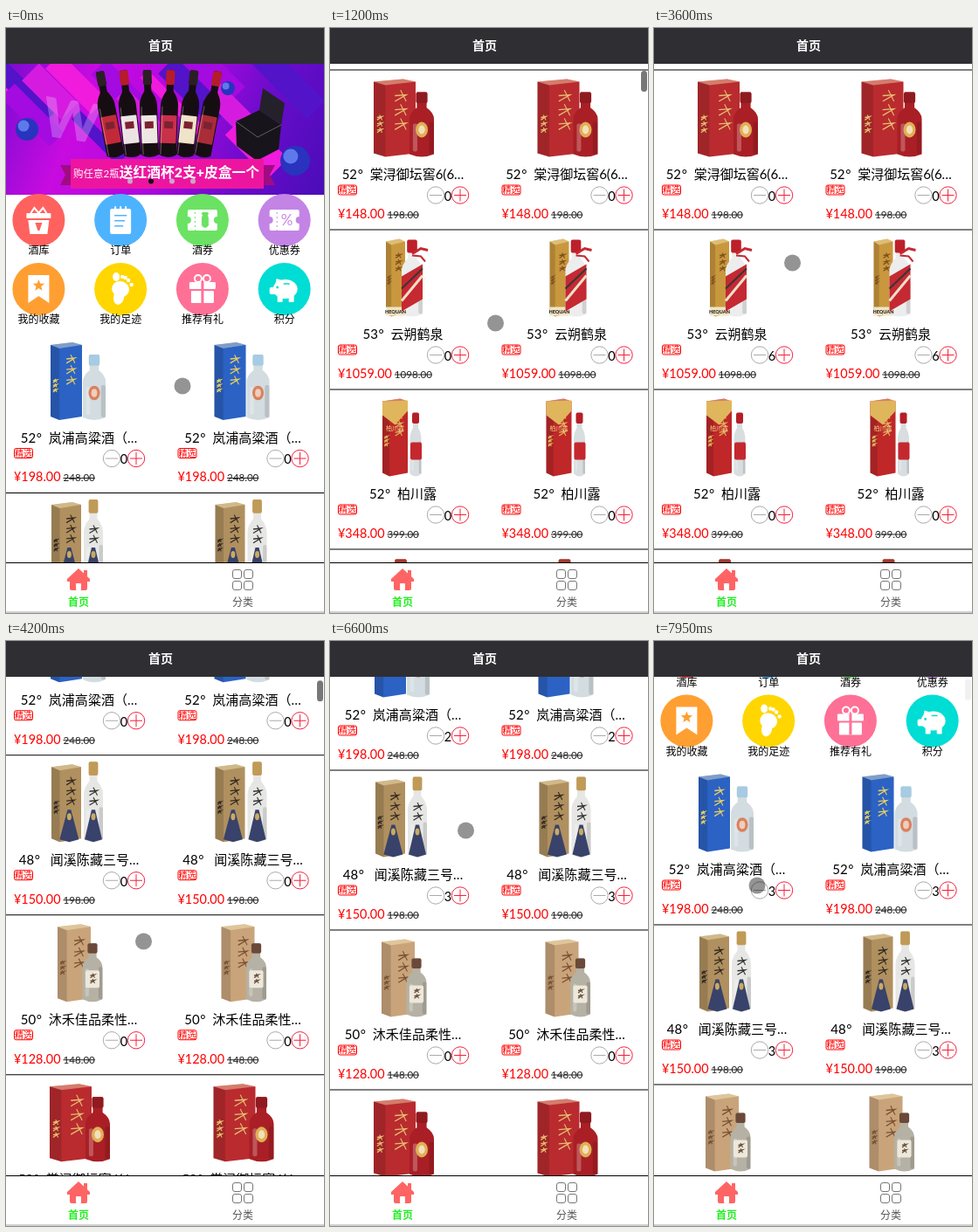
An HTML page with a canvas for the animation above (8000 ms loop, 364 px wide and 670 px high).

```html
<!DOCTYPE html>
<html lang="zh">
<head>
<meta charset="utf-8">
<title>首页</title>
<style>
html, body { margin: 0; width: 100%; height: 100%; overflow: hidden; background: #fff; }
canvas { display: block; width: 364px; height: 670px; }
</style>
</head>
<body>
<canvas id="stage"></canvas>
<script>
const W = 364, H = 670, LOOP = 8000, STEP = 150;
const TOP = 41, BAR = 612, FIRST = 349, ROW = 183, COL = 187.5;
const FONT = 'Lato, "Noto Sans CJK SC", "Noto Sans CJK", sans-serif';
const RED = '#f5203c';
const canvas = document.getElementById('stage');
const ctx = canvas.getContext('2d');
const ratio = window.devicePixelRatio || 1;
canvas.width = W * ratio;
canvas.height = H * ratio;

// Motion
const flicks = [
  { start: 0, time: 600, by: 236 },
  { start: 600, time: 600, by: 614.5 },
  { start: 3600, time: 900, by: -466 },
  { start: 6600, time: 750, by: -177 }
];
const tapRuns = [
  { row: 4, start: 1650, times: 6 },
  { row: 1, start: 4800, times: 3 },
  { row: 0, start: 5850, times: 2 },
  { row: 0, start: 7500, times: 1 }
];
const TAP_GAP = 300;
// Finger rests: time, x, y
const touches = [[0, 202, 410], [600, 186, 419.5], [1200, 189.5, 338], [1500, 151, 373],
  [3150, 151, 373], [3600, 158.5, 269], [4200, 157.5, 344], [4650, 151, 291], [5400, 151, 291],
  [5700, 151, 108], [6150, 151, 108], [6600, 155.5, 217], [7350, 150, 287], [7600, 150, 287],
  [7950, 118, 280]];

const clamp = v => Math.min(1, Math.max(0, v));
const easeOut = p => 1 - (1 - p) ** 3;
const easeBoth = p => p * p * (3 - 2 * p);

const scrollAt = t => flicks.reduce((sum, f) => sum + f.by * easeOut(clamp((t - f.start) / f.time)), 0);
const barAlpha = t => Math.max(...flicks.map(f =>
  t > f.start ? clamp((f.start + f.time + 630 - t) / 300) : 0));
const countAt = (row, t) => tapRuns.filter(r => r.row === row && t >= r.start)
  .reduce((sum, r) => sum + Math.min(r.times, Math.floor((t - r.start) / TAP_GAP) + 1), 0);

function touchAt(t) {
  const i = touches.findIndex(k => k[0] > t);
  if (i < 0) return touches[touches.length - 1].slice(1);
  const [t0, x0, y0] = touches[i - 1], [t1, x1, y1] = touches[i];
  const p = easeBoth((t - t0) / (t1 - t0));
  return [x0 + (x1 - x0) * p, y0 + (y1 - y0) * p];
}

// Drawing helpers
function rect(c, x, y, w, h, r = 0) {
  ctx.fillStyle = c;
  ctx.beginPath();
  ctx.roundRect(x, y, w, h, r);
  ctx.fill();
}
function frame(c, x, y, w, h, r) {
  ctx.strokeStyle = c;
  ctx.lineWidth = 1;
  ctx.beginPath();
  ctx.roundRect(x, y, w, h, r);
  ctx.stroke();
}
function trace(p) {
  ctx.beginPath();
  for (let i = 0; i < p.length; i += 2) ctx.lineTo(p[i], p[i + 1]);
}
function poly(c, ...p) {
  trace(p);
  ctx.fillStyle = c;
  ctx.fill();
}
function line(c, lw, ...p) {
  trace(p);
  ctx.strokeStyle = c;
  ctx.lineWidth = lw;
  ctx.stroke();
}
function oval(c, x, y, rx, ry = rx, turn = 0) {
  ctx.fillStyle = c;
  ctx.beginPath();
  ctx.ellipse(x, y, rx, ry, turn, 0, 7);
  ctx.fill();
}
function ring(c, x, y, r, lw = 1) {
  ctx.strokeStyle = c;
  ctx.lineWidth = lw;
  ctx.beginPath();
  ctx.arc(x, y, r, 0, 7);
  ctx.stroke();
}
function shift(x, y, draw, turn = 0) {
  ctx.save();
  ctx.translate(x, y);
  ctx.rotate(turn);
  draw();
  ctx.restore();
}
// Vertically centred text; returns its width
function label(s, x, y, size, c = '#000', align = 'center', weight = 400) {
  ctx.font = `${weight} ${size}px ${FONT}`;
  ctx.textAlign = align;
  ctx.fillStyle = c;
  ctx.fillText(s, x, y + size * 0.37);
  return ctx.measureText(s).width;
}
// Bottle standing on y
function bottle(c, cap, x, y, w, h) {
  const b = w / 2, n = Math.max(3, w * 0.2), top = y - h, s = top + h * 0.36;
  ctx.fillStyle = c;
  ctx.beginPath();
  ctx.moveTo(x - n, top);
  ctx.lineTo(x - n, s - h * 0.12);
  ctx.quadraticCurveTo(x - b, s - 3, x - b, s + 4);
  ctx.lineTo(x - b, y - 3);
  ctx.quadraticCurveTo(x, y + 3, x + b, y - 3);
  ctx.lineTo(x + b, s + 4);
  ctx.quadraticCurveTo(x + b, s - 3, x + n, s - h * 0.12);
  ctx.lineTo(x + n, top);
  ctx.fill();
  rect(cap, x - n - 1, top, n * 2 + 2, h * 0.17, 2);
}
// Brush marks standing in for vertical lettering
function brush(c, x, y, size, n) {
  const s = size / 2;
  for (let i = 0; i < n; i++) {
    const v = y + i * size * 1.25;
    line(c, 1.3, x - s, v, x + s, v - 1, x - s, v + s);
    line(c, 1.1, x, v - s, x + s, v + s);
  }
}

// Marks on the packs; each gets the product
function seal({ cx, ink, bw }) {
  oval(ink, cx, 69, bw * 0.25, bw * 0.32);
  oval('rgba(255,255,255,.6)', cx, 69, bw * 0.13, bw * 0.18);
}
function skirt({ x, w, cx, ink }) {
  brush(ink, cx, 42, 9, 2);
  for (const [mid, half] of [[x + w * 0.6, 11], [cx, 10]]) {
    poly('#38426a', mid - 2, 63, mid + 2, 63, mid + half, 97, mid, 100, mid - half, 97);
    oval('#c9aa60', mid, 71, 2.5, 4);
  }
}
function paper({ cx, bw, ink }) {
  rect('#eee8da', cx - bw * 0.35, 64, bw * 0.7, 20, 2);
  brush(ink, cx, 70, 5, 2);
}
function sash({ x, w, cx }) {
  rect('#f1e4c2', x, 89, w, 10);
  label('HEQUAN', x + w / 2, 94.5, 5.5, '#333', 'center', 900);
  line('#c52932', 3, cx, 28, cx + 10, 22, cx + 18, 24);
  line('#c52932', 2, cx, 30, cx + 10, 31, cx + 15, 37);
  poly('#c52932', cx - 12, 54, cx + 12, 40, cx + 12, 80, cx - 12, 94);
  line('#f0dfc9', 3, cx - 12, 82, cx + 12, 53);
  line('#383636', 2, cx - 12, 68, cx + 12, 45);
}
function goldTop(item) {
  const { x, w } = item;
  poly('#dfb65b', x, 14, x + w, 13, x + w, 25, x + w / 2, 41, x, 30);
  label('柏川露', x + w / 2, 45, 7, '#f4dc8c');
  rect('#c4282e', item.cx - 6, 61, 13, 20, 2);
}

// x, w: box; cx, bw, bh: bottle
const goods = [
  { deg: 52, name: '岚浦高粱酒（…', price: 198, was: 248, x: 51, w: 36, cx: 101, bw: 26, bh: 75,
    card: '#2b62c4', glass: '#d3dce0', cap: '#a7cbe2', ink: '#d9825c', text: '#e9cf62', mark: seal },
  { deg: 48, name: '闻溪陈藏三号…', price: 150, was: 198, x: 52, w: 34, cx: 100, bw: 22, bh: 92, gap: 4,
    card: '#b0905f', glass: '#e6e6e4', cap: '#c09a57', ink: '#333', text: '#352a22', mark: skirt },
  { deg: 50, name: '沐禾佳品柔性…', price: 128, was: 148, x: 59, w: 38, cx: 99, bw: 23, bh: 67,
    card: '#c9a47b', glass: '#b5b1a4', cap: '#6b4939', ink: '#68503e', text: '#7a5130', mark: paper },
  { deg: 52, name: '棠浔御坛窖6(6…', price: 148, was: 198, x: 50, w: 48, cx: 105, bw: 28, bh: 74,
    card: '#b92b2f', glass: '#a91f25', cap: '#8f1a20', ink: '#e0b055', text: '#e6c070', mark: seal },
  { deg: 53, name: '云朔鹤泉', price: 1059, was: 1098, x: 64, w: 22, cx: 94, bw: 24, bh: 88,
    card: '#c9983e', glass: '#ededed', cap: '#bd2029', text: '#7e501e', mark: sash },
  { deg: 52, name: '柏川露', price: 348, was: 399, x: 60, w: 29, cx: 98, bw: 13, bh: 73,
    card: '#bf2729', glass: '#d8dde0', cap: '#b51e27', text: '#dfb65b', mark: goldTop },
  { deg: 52, name: '禾汀酿', price: 168, was: 188, x: 68, w: 12, cx: 81, bw: 30, bh: 88,
    card: '#fff', glass: '#8e2f27', cap: '#a3392c', ink: '#d8b060', text: '#fff', mark: seal }
];

function pack(item) {
  const { x, w, cx, bw, bh } = item, edge = x + w * 0.28, end = x + w;
  poly(item.card, x, 14, x + w * 0.7, 11, end, 14, end, 96, edge, 100, x, 96);
  poly('rgba(0,0,0,.14)', x, 14, edge, 18, edge, 100, x, 96);
  poly('rgba(255,245,200,.4)', x, 14, x + w * 0.7, 11, end, 14, edge, 18);
  brush(item.text, x + w * 0.64, 30, w * 0.27, 3);
  brush(item.text, x + w * 0.14, 55, w * 0.12, 3);
  bottle(item.glass, item.cap, cx, 100, bw, bh);
  rect('rgba(255,255,255,.25)', cx - bw * 0.36, 62, bw * 0.18, 32, 2);
  rect('rgba(0,0,0,.12)', cx + bw * 0.3, 60, bw * 0.2, 37, 2);
  item.mark(item);
}

function card(item, count) {
  pack(item);
  const lead = 32 + (item.gap || 0);
  ctx.font = `400 15px ${FONT}`;
  const x = 83.5 - (lead + ctx.measureText(item.name).width) / 2;
  label(item.deg, x, 120, 15, '#000', 'left');
  label('°', x + 18, 120, 15, '#000', 'left');
  label(item.name, x + lead, 120, 15, '#000', 'left');
  frame('#f00', 9.5, 132.5, 21, 11, 2);
  label('精选', 20, 138, 10, '#f00');
  for (const [mid, c] of [[121, '#aaa'], [149, RED]]) {
    ring(c, mid, 144, 9.7);
    line(c, 1, mid - 7, 144, mid + 7, 144);
  }
  line(RED, 1, 149, 137, 149, 151);
  label(count, 135, 145, 14.5);
  const w = label(`¥${item.price}.00`, 9, 165, 14.4, '#f00', 'left');
  const old = label(`${item.was}.00`, 12 + w, 166, 11.6, '#222', 'left');
  line('#222', 1, 12 + w, 166.5, 12 + w + old, 166.5);
}

function random(seed) {
  return () => (seed = seed * 16807 % 2147483647) / 2147483647;
}

function wine(i) {
  const paper = ['#c22a3a', '#ece4e4', '#eee6e2', '#c9304a', '#efe3c8', '#a92c38'][i];
  const cap = i % 2 ? '#b51c2c' : '#2a2024';
  bottle('#160d12', cap, 0, 0, 20, 100);
  rect(paper, -9, -48, 18, 32, 1);
  rect('#7d2231', -5, -41, 10, 8);
  line('rgba(255,255,255,.35)', 1, -8, -58, -8, -3);
}

function banner() {
  ctx.save();
  ctx.beginPath();
  ctx.rect(0, 41, W, 150);
  ctx.clip();
  const g = ctx.createLinearGradient(0, 41, W, 191);
  ['#7a0cd0', '#c80be0', '#b008e0', '#6a0ccb', '#4a0cb8'].forEach((c, i) => g.addColorStop(i / 4, c));
  rect(g, 0, 41, W, 150);
  const rnd = random(11), tones = ['#f01bdc', '#5313c9', '#a30be0', '#d61be0'];
  for (let i = 0; i < 14; i++) {
    const x = i * 26 - 50, y = 25 + rnd() * 90, d = 35 + rnd() * 45;
    line(tones[i % 4], 12 + rnd() * 22, x, y, x + d, y + d);
  }
  shift(75, 105, () => label('W', 0, 0, 62, 'rgba(235,205,255,.3)', 'center', 900), 0.15);
  for (const [x, y, r] of [[24, 116, 13], [254, 69, 8], [331, 152, 17]]) {
    oval('#2933bd', x, y, r);
    oval('#5e79ec', x - r * 0.3, y - r * 0.3, r * 0.5);
  }
  for (let i = 0; i < 6; i++) shift(126 + i * 19.6, 148, () => wine(i), (i - 2.5) * 0.075);
  poly('#17141b', 263, 107, 290, 94, 315, 111, 312, 139, 287, 152, 264, 135);
  poly('#25212a', 290, 94, 294, 69, 319, 86, 315, 111);
  line('#625d67', 1, 263, 107, 288, 125, 315, 111);
  poly('#a10b82', 62, 157, 308, 157, 302, 168, 308, 180, 62, 180, 68, 168);
  rect('#ed159f', 74, 150, 221, 34);
  const w = label('购任意2瓶', 77, 167, 11.5, '#fff', 'left');
  label('送红酒杯2支+皮盒一个', 77 + w, 165, 15.8, '#fff', 'left', 900);
  for (let i = 0; i < 4; i++) oval(i === 1 ? '#111' : '#c9a5c8', 142 + i * 24, 175.5, 3);
  ctx.restore();
}

// Menu icons, drawn around the centre of their disc
function ticket(c) {
  rect('#fff', -17, -12, 34, 24, 2);
  oval(c, -17, 0, 4);
  oval(c, 17, 0, 4);
  for (let y = -9; y < 12; y += 5) rect(c, -9, y, 1, 2);
}
function cellar(c) {
  rect('#fff', -14, -8, 28, 6, 1);
  poly('#fff', -12, 0, 12, 0, 10, 16, -10, 16);
  line('#fff', 2, -9, -8, -5, -14, 0, -8, 5, -14, 9, -8);
  poly(c, -4, 3, 4, 3, 1, 12, -1, 12);
}
function orders(c) {
  rect('#fff', -12, -13, 24, 29, 2);
  for (let i = 0; i < 3; i++) {
    rect('#fff', i * 6 - 7, -16, 2, 5, 1);
    rect(c, -7, i * 6 - 6, 14 - i * 2, 1.5);
  }
}
function bookmark(c) {
  poly('#fff', -12, -16, 12, -16, 12, 16, 0, 8, -12, 16);
  const star = [];
  for (let i = 0; i < 10; i++) {
    const r = i % 2 ? 3 : 7, a = i * Math.PI / 5;
    star.push(r * Math.sin(a), -4 - r * Math.cos(a));
  }
  poly(c, ...star);
}
function foot() {
  oval('#fff', 0, 0, 10, 9, 0.3);
  oval('#fff', -2, 9, 6, 9, 0.2);
  oval('#fff', -5, -14, 4, 5);
  for (let i = 0; i < 4; i++) oval('#fff', 2 + i * 3.5, -14 + i * i, 2.2);
}
function present(c) {
  for (const x of [-5, 5]) ring('#fff', x, -12, 4, 2);
  rect('#fff', -15, -8, 30, 8, 1);
  rect('#fff', -13, 2, 26, 14, 1);
  rect(c, -1.5, -8, 3, 24);
}
function piggy(c) {
  oval('#fff', 1, 0, 14, 11);
  poly('#fff', -9, -12, 0, -9, -11, -3);
  rect('#fff', -17, -2, 8, 8, 2);
  for (const x of [-8, 5]) rect('#fff', x, 7, 6, 8, 1);
  oval(c, -8, -2, 1.4);
  line(c, 1.5, -1, -6, 6, -6);
}
const menu = [
  ['酒库', '#ff625e', cellar],
  ['订单', '#4eb3ff', orders],
  ['酒券', '#6be263', c => { ticket(c); bottle(c, c, 3, 9, 8, 18); }],
  ['优惠券', '#c384e6', c => { ticket(c); label('%', 3, 0, 17, c); }],
  ['我的收藏', '#ff9f31', bookmark],
  ['我的足迹', '#ffd600', foot],
  ['推荐有礼', '#ff7096', present],
  ['积分', '#00ddd4', piggy]
];

function page(t, scroll) {
  banner();
  menu.forEach(([name, c, icon], i) => {
    const x = 37.4 + i % 4 * COL / 2, y = i < 4 ? 220 : 299;
    oval(c, x, y, 30);
    shift(x, y, () => icon(c));
    label(name, x, y + 35, 12);
  });
  goods.forEach((item, i) => {
    const y = FIRST + i * ROW;
    for (const x of [0, COL]) shift(x, y, () => card(item, countAt(i, t)));
    rect('#000', 0, y + ROW, W, 1);
  });
}

function chrome() {
  rect('#2f2e33', 0, 0, W, TOP);
  label('首页', 177, 20, 14, '#fff', 'center', 700);
  rect('#fff', 0, BAR, W, H - BAR);
  rect('#000', 0, BAR, W, 1);
  const red = '#ff6464';
  poly(red, 83, 619, 96, 631, 96, 634, 70, 634, 70, 631);
  rect(red, 73, 632, 20, 12, 2);
  rect(red, 89, 621, 4, 8);
  rect('#fff', 80, 636, 6, 8, 1);
  label('首页', 83, 657.5, 12, '#22f022', 'center', 700);
  for (let i = 0; i < 4; i++) frame('#777', 259.5 + i % 2 * 13, 620.5 + (i >> 1) * 13, 10, 10, 2.5);
  label('分类', 271, 657.5, 12, '#555', 'center', 500);
  rect('#d0d0d0', 0, 668, W, 2);
}

function paint(now) {
  const t = Math.floor(now % LOOP / STEP) * STEP;
  const scroll = scrollAt(t);
  ctx.setTransform(ratio, 0, 0, ratio, 0, 0);
  rect('#fff', 0, 0, W, H);
  ctx.save();
  ctx.beginPath();
  ctx.rect(0, TOP, W, BAR - TOP);
  ctx.clip();
  shift(0, -scroll, () => page(t, scroll));
  ctx.globalAlpha = barAlpha(t);
  rect('#777', 356, 42 + scroll * 0.0082, 7, 24, 3.5);
  ctx.restore();
  chrome();
  oval('rgba(0,0,0,.42)', ...touchAt(t), 9.5);
}

const start = performance.now();
function tick() {
  paint(performance.now() - start);
  requestAnimationFrame(tick);
}
tick();
</script>
</body>
</html>
```
